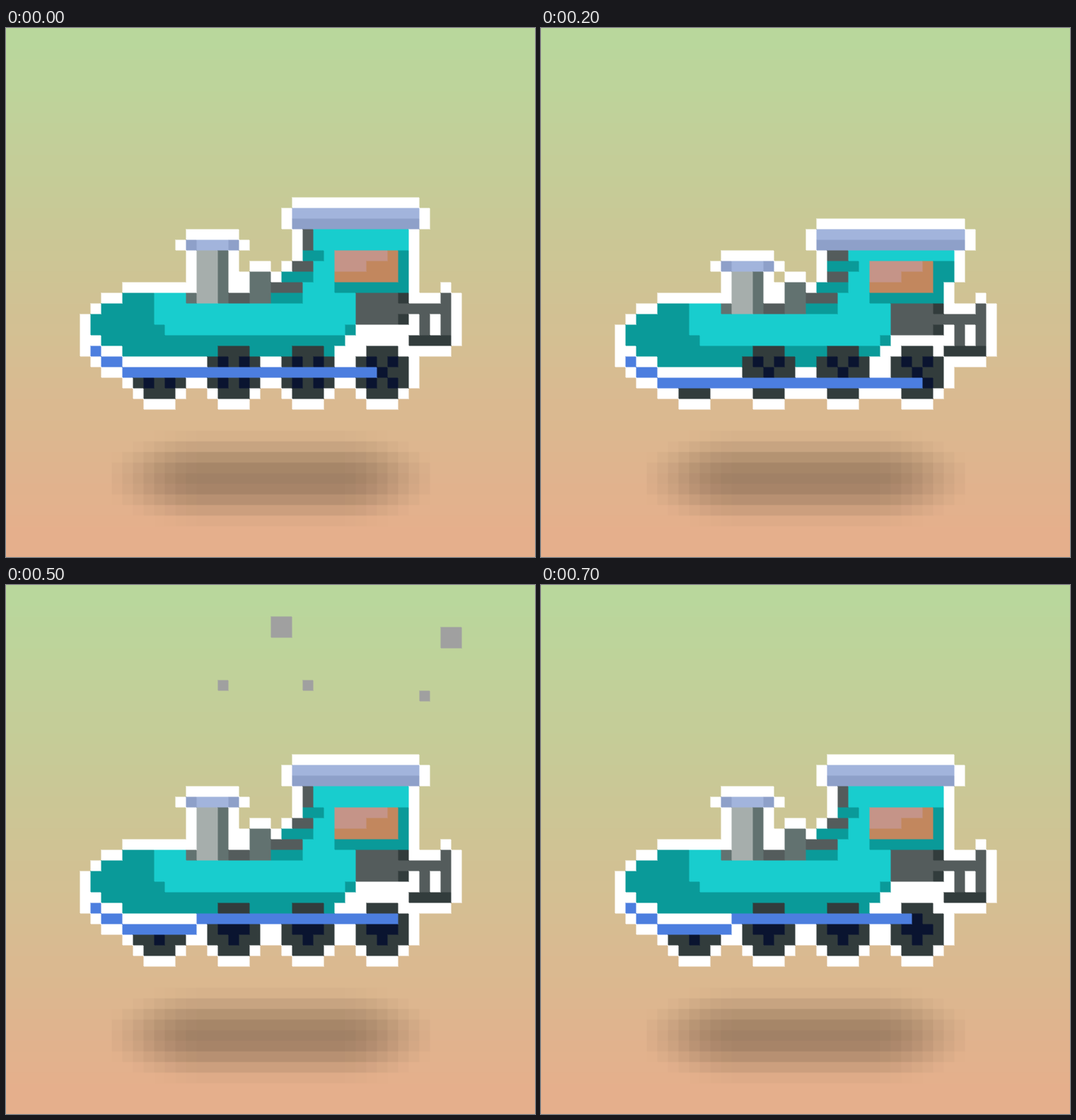
An HTML page with a canvas that plays this animation: 748x748 px, repeating every 800 ms.

```html
<!DOCTYPE html>
<html lang="en">
<head>
<meta charset="utf-8">
<title>Little locomotive</title>
<style>
html, body { margin: 0; width: 100%; height: 100%; overflow: hidden; }
canvas { display: block; width: 100vw; height: 100vh; }
</style>
</head>
<body>
<canvas id="stage" width="748" height="748"></canvas>
<script>
const CELLS = 50, UNIT = 15, STEP = 100, STEPS = 8;

const stage = document.getElementById('stage').getContext('2d');
const art = document.createElement('canvas');
art.width = art.height = CELLS;
const ctx = art.getContext('2d');

const TEAL = '#18cdce', DEEP = '#0a9a99', SLATE = '#545d5d', COAL = '#333c3d',
  NAVY = '#0a1530', ROD = '#4d7edf', ROOF = '#a2b4dc', EAVE = '#8ea0c9',
  PIPE = '#a6aeac', IRON = '#637270', PINK = '#c59488', BROWN = '#c2875e',
  SMOKE = '#a0a0a0', WHITE = '#ffffff';

// crouch, leap, settle: rows the roof moves down
const HOP = [0, 1, 2, -3, -1];
const LEAP = HOP.indexOf(-3);

// smoke scraps: x, y, w, h, then drift
const SCRAPS = [
  [26, 2, 5, 5, -1, 1], [39, 5, 4, 4, 2, -1], [19, 12, 2, 2, 1, -3],
  [27, 11, 4, 3, 1, -2], [37, 12, 3, 2, 2, -2]
];

function block(x, y, w, h, color) {
  ctx.fillStyle = color;
  ctx.fillRect(x, y, w, h);
}

function backdrop() {
  const top = [185, 215, 156], bottom = [229, 175, 140];
  for (let y = 0; y < CELLS; y++) {
    const k = Math.min(1, Math.max(0, (y - 1) / 46));
    block(0, y, CELLS, 1, `rgb(${top.map((c, i) => Math.round(c + (bottom[i] - c) * k))})`);
  }
  for (let y = 38; y < 47; y++) {
    for (let x = 10; x < 40; x++) {
      const dx = Math.max(0, Math.abs(x - 24.5) - 6.5) / 9.5;
      const r = Math.hypot(dx, (y - 42) / 4.6);
      if (r < 1) block(x, y, 1, 1, `rgba(0,0,0,${0.28 * Math.cos(r * Math.PI / 2) ** 1.6})`);
    }
  }
}

function engine(step) {
  const hop = HOP[step] || 0;
  const roof = 17 + hop;
  const lift = hop < 0 ? hop + 1 : hop;
  const cap = 20 + lift;
  const b = Math.max(-1, Math.min(1, lift));
  const wide = hop === 2 ? 1 : 0, tall = b < 0 ? 1 : 0, stretched = hop < 0;

  // the rod end runs round a small circle
  const turn = step / STEPS * 2 * Math.PI;
  const rod = 32 + Math.round(Math.sin(turn));
  const rodEnd = 36 - Math.round(Math.cos(turn));
  const sill = Math.max(rod, 32), k = sill - 32;

  const parts = [];
  const add = (color, x, y, w = 1, h = 1) => parts.push([x, y, w, h, color]);

  // boiler
  add(DEEP, 11 + tall, 25 + b, 3 - tall);
  add(DEEP, 9, 26 + b, 5);
  add(DEEP, 8, 27 + b, 24, 3 + k - b);
  add(DEEP, 9, 30 + k, 22);
  add(TEAL, 14, 25 + b, 19, 3 + 2 * tall);
  add(TEAL, 15, 28 + k, 17);
  add(DEEP, 32, 28 + k - tall);

  // coupling
  add(SLATE, 33, 25 + b, 4, 3 + tall);
  add(COAL, 37, 25 + b, 1, 3 + tall);
  add(SLATE, 37, 26 + b, 4);
  add(SLATE, 41, 25 + b, 1, 4);
  add(SLATE, 39, 27 + b, 1, 2);
  add(COAL, 38, 29 + b, 4);

  // cab
  add(TEAL, 28, 24 + b);
  add(TEAL, 29, roof + 2, 9 + wide, 20 + b - roof);
  add(TEAL, 29, 22 + b, 9, 3);
  add(DEEP, 37, 21 + b, 1 + wide, 3 - wide);
  add(DEEP, 31, 24 + b, 7);
  add(DEEP, 37, 23 + b);
  add(BROWN, 31, 21 + b, 6, 3);
  add(PINK, 31, 21 + b, 5);
  add(PINK, 31, 22 + b, 3);
  add(ROOF, 27 - wide, roof, 12 + 2 * wide);
  add(EAVE, 27 - wide, roof + 1, 12 + 2 * wide);

  // stepped cab front
  add(SLATE, 28 - wide, roof + 2, 1 + wide, 19 + b - roof);
  if (stretched) add(DEEP, 28, roof + 4, 2);
  const treads = stretched ? [1, 3, 3, 3, 4] : [2 + wide, 2, 3, 3, 3];
  treads.forEach((w, i) => {
    const dark = stretched ? i % 3 === 1 : i % 2 === 0;
    add(dark ? DEEP : SLATE, i ? Math.max(25, 28 - i) : 28 - wide, 21 + b + i, w);
  });

  // chimney and dome
  add(EAVE, 17, cap, 5);
  add(ROOF, 18, cap, 3);
  add(PIPE, 18, cap + 1, 2, 25 + b - cap);
  add(IRON, 20, cap + 1, 1, 25 + b - cap);
  if (!tall) add(IRON, 17, 25 + b);
  add(SLATE, 21, 25 + b, 2);
  add(IRON, 23, 23 + b, 2, 3);

  // wheels: spokes alternate between a cross and a plus
  add(COAL, 12, 33, 5);
  add(COAL, 13, 34, 3);
  const drivers = [21, 28, 35];
  for (const cx of drivers) {
    add(COAL, cx - 1, 30, 3, 5);
    add(COAL, cx - 2, 31, 5, 3);
    add(NAVY, cx, 32);
  }
  for (let i = 0; i < 4; i++) {
    const a = (i + (step % 2 ? 0 : 0.5)) * Math.PI / 2;
    const dx = Math.round(Math.cos(a)), dy = Math.round(Math.sin(a));
    for (const cx of drivers) add(NAVY, cx + dx, 32 + dy);
    if (dy > 0) add(NAVY, 14 + dx, 33);
  }

  // coupling rod
  add(WHITE, 8, sill - 3);
  add(WHITE, 9, sill - 2, 2);
  add(ROD, 8, sill - 2);
  add(ROD, 9, sill - 1, 2);
  add(ROD, 11, sill, 7);
  add(ROD, 18, rod, rodEnd - 18);

  for (const [x, y, w, h] of parts) {
    block(x - 1, y, w + 2, h, WHITE);
    block(x, y - 1, w, h + 2, WHITE);
  }
  block(32, 28, 6, 3, WHITE);
  for (const p of parts) block(...p);
}

// round above its centre row, tapering below
function puff(cx, cy, rx, up, down) {
  for (let d = -Math.floor(up); d <= down; d++) {
    const half = Math.floor(rx * (d < 0 ? Math.sqrt(1 - (d / up) ** 2) : 1 - (d / down) ** 1.7));
    block(cx - half, cy + d, 2 * half + 1, 1, SMOKE);
  }
}

function smoke(age) {
  if (age === 0) {
    puff(33, 5, 6.6, 3.55, 7.3);
    puff(19, 14, 1.4, 2.3, 2.3);
  }
  for (const [x, y, w, h, dx, dy] of SCRAPS) {
    const small = Math.floor(Math.min(w, h) / 2);
    if (age === 1) block(x, y, w, h, SMOKE);
    if (age === 2) block(x + dx, y + dy, small, small, SMOKE);
  }
}

// cell borders fall on half pixels, so two shifted copies are averaged
function present() {
  stage.imageSmoothingEnabled = false;
  for (const shift of [0, 1]) {
    stage.globalAlpha = 1 - shift / 2;
    stage.drawImage(art, -shift, -shift, CELLS * UNIT, CELLS * UNIT);
  }
}

let shown = -1;
function frame(now) {
  const step = Math.floor(now / STEP) % STEPS;
  if (step !== shown) {
    shown = step;
    backdrop();
    engine(step);
    smoke(step - LEAP);
    present();
  }
  requestAnimationFrame(() => frame(performance.now()));
}
frame(0);
</script>
</body>
</html>
```
